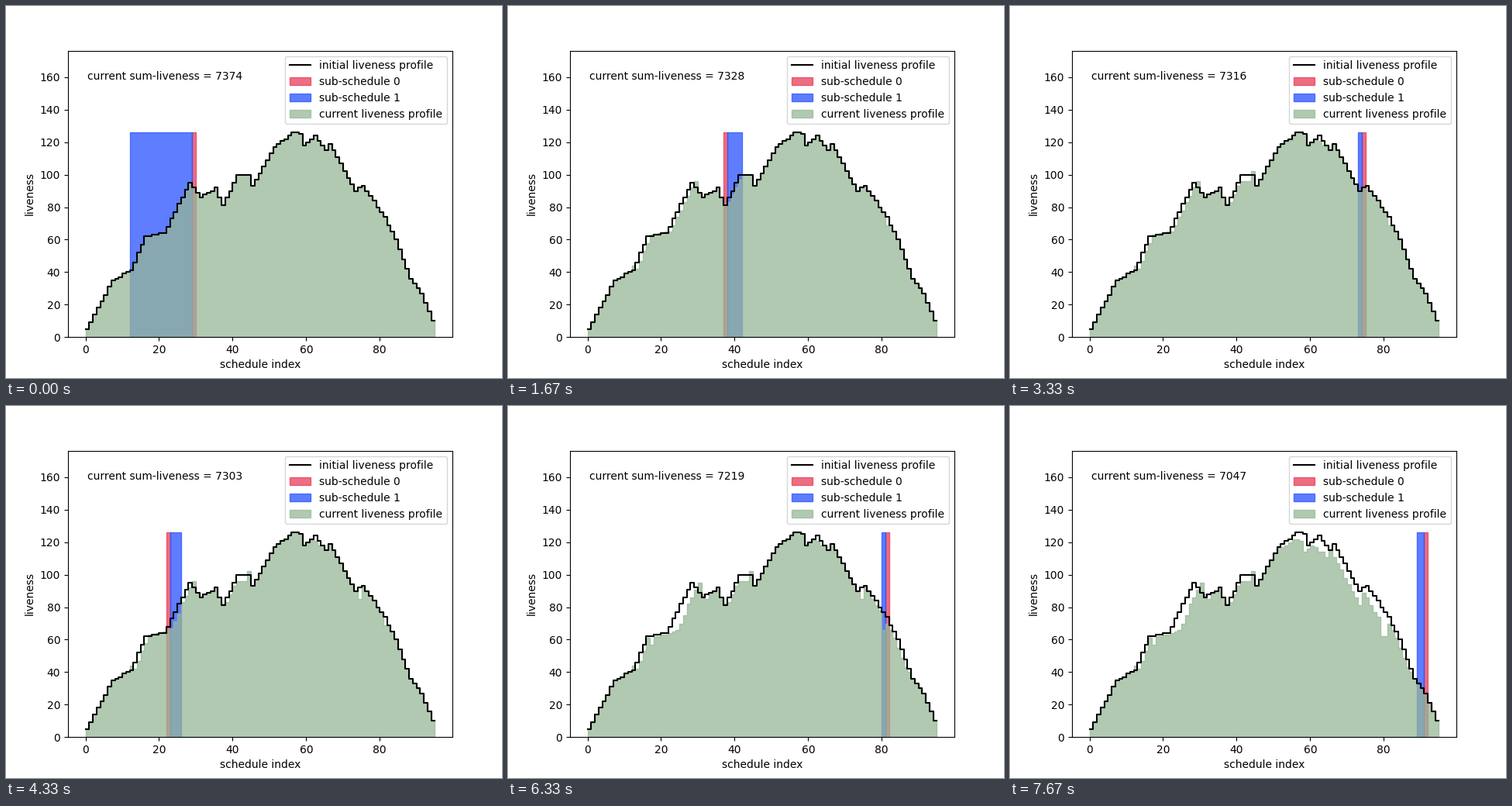
Write a matplotlib script that moves like this. It is 640 by 480 pixels and loops after 8 s.

```python
import math
from itertools import accumulate

import matplotlib.pyplot as plt
import numpy as np
from matplotlib.animation import FuncAnimation
from matplotlib.patches import Patch

RED, BLUE, GREEN = "#e83c57", "#2852ff", "#97b797"
ALPHA = 0.75
LOOP_MS, TICK_MS, VIEWS = 8000, 40, 24
TICKS = LOOP_MS // TICK_MS
START_TOTAL = 7374

# Turning points (index, liveness) of the initial profile.
TURNS = [(0, 5), (7, 35), (12, 41), (16, 62), (21, 64), (28, 95), (31, 86),
         (35, 92), (37, 81), (41, 100), (44, 100), (45, 93), (51, 117),
         (56, 126), (58, 125), (59, 118), (62, 124), (65, 115), (66, 119),
         (73, 90), (75, 93), (81, 74), (84, 60), (88, 36), (91, 27), (94, 10)]

# One moved schedule step per swap: (from, to, change of the total).
MOVES = [(29, 12, -31), (81, 80, -5), (41, 37, -10), (62, 64, -6),
         (39, 44, -6), (74, 73, -7), (25, 22, -6), (32, 16, -43),
         (77, 87, -37), (80, 81, -4), (52, 80, -169), (89, 91, -3)]


def apply_move(profile, move):
    """Move one step; the steps it passes shift by one and by a shared offset."""
    src, dst, gain = move
    passed_count = abs(dst - src)
    offset = math.floor((gain + profile[src] - profile[dst]) / passed_count + 0.5)
    landing = profile[src] + gain - passed_count * offset
    lo, hi = min(src, dst), max(src, dst) + 1
    result = profile.copy()
    result[lo:hi] += offset
    result[lo:hi] = np.roll(result[lo:hi], 1 if dst < src else -1)
    result[dst] = landing
    return result


def closed(profile):
    return np.append(profile, profile[-1])


count = TURNS[-1][0] + 1
xs = np.arange(count + 1)
initial = np.rint(np.interp(xs[:-1], *zip(*TURNS))).astype(int)
peak = initial.max()
profiles = list(accumulate(MOVES, apply_move, initial=initial))
totals = list(accumulate((gain for _, _, gain in MOVES), initial=START_TOTAL))

fig = plt.figure(figsize=(6.4, 4.8), dpi=100)
ax = fig.add_subplot()
ax.set_xlim(-0.05 * count, 1.05 * count)
ax.set_ylim(0, 1.4 * peak)
ax.set_xlabel("schedule index")
ax.set_ylabel("liveness")
line, = ax.plot(xs, closed(initial), color="black", drawstyle="steps-post")
label = ax.text(0.05, 0.9, "", transform=ax.transAxes)
ax.legend(
    [line] + [Patch(color=c, alpha=ALPHA) for c in (RED, BLUE, GREEN)],
    ["initial liveness profile", "sub-schedule 0", "sub-schedule 1",
     "current liveness profile"],
    loc="upper right")
fills = []


def fill(x, y, color):
    fills.append(ax.fill_between(x, y, step="post", color=color, alpha=ALPHA))


def update(tick):
    while fills:
        fills.pop().remove()
    # A view that begins within this tick is already shown.
    view = ((tick + 1) * VIEWS - 1) // TICKS
    swap, moved = divmod(view, 2)
    src, dst, _ = MOVES[swap]
    red = dst if moved else src
    lo, hi = min(src, dst), max(src, dst) + 1
    blue = (lo + 1, hi) if red == lo else (lo, hi - 1)
    fill((red, red + 1), (peak, peak), RED)
    fill(blue, (peak, peak), BLUE)
    fill(xs, closed(profiles[swap + moved]), GREEN)
    label.set_text(f"current sum-liveness = {totals[swap + moved]}")
    return fills + [label]


anim = FuncAnimation(fig, update, frames=TICKS, interval=TICK_MS,
                     repeat=True, repeat_delay=0)
plt.show()
```
